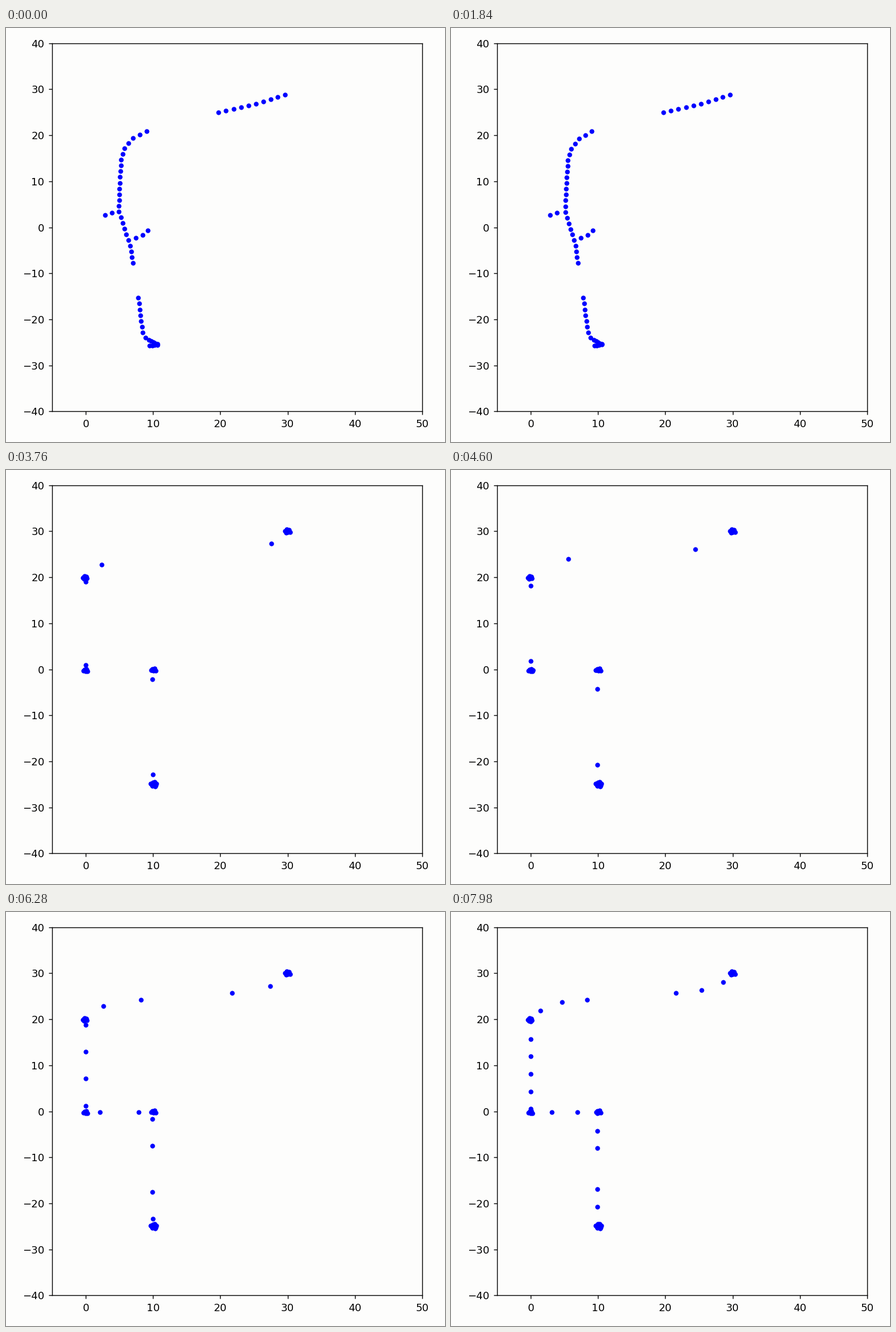
A matplotlib script that plays this animation: 771x726 px, repeating every 8 s.

```python
import numpy as np
import matplotlib.pyplot as plt
from matplotlib.animation import FuncAnimation

W, H, DPI = 771, 726, 128
LEFT, RIGHT, TOP, BOTTOM = 81, 731, 26.6, 672.4
BG = "#fdfdfc"
RESET = 56                      # step at which the swarm restarts
GOLDEN = np.pi * (3 - 5 ** 0.5)


def along(path, dist):
    """Points at the given arc lengths of a polyline."""
    path = np.asarray(path, float)
    seg = np.hypot(*np.diff(path, axis=0).T)
    arc = np.concatenate([[0], np.cumsum(seg)])
    return np.column_stack([np.interp(dist, arc, path[:, c]) for c in (0, 1)])


def spread(path, n):
    """n evenly spaced points from one end of a polyline to the other."""
    length = np.hypot(*np.diff(path, axis=0).T).sum()
    return along(path, np.linspace(0, length, n))


def clump(x, y, n, radius):
    i = np.arange(n)
    r = radius * np.sqrt((i + 0.5) / n)
    return np.column_stack([x + r * np.cos(i * GOLDEN),
                            y + r * np.sin(i * GOLDEN)])


# Late phase: evenly filled strands that slowly straighten.
BODY = [(9.05, 20.85), (7, 19.3), (5.8, 17.3), (5.25, 14.7), (5, 8.5),
        (4.9, 3.5), (5.7, -0.2), (6.6, -4), (7, -7.8)]
STRANDS = [
    spread(BODY, 25),
    spread([(19.7, 24.95), (24.8, 26.6), (29.6, 28.85)], 10),
    spread([(2.9, 2.65), (3.9, 3.1)], 2),
    spread([(7.45, -2.35), (8.45, -1.75), (9.2, -0.7)], 3),
    spread([(7.8, -15.35), (8.45, -22.7), (8.9, -24)], 8),
    spread([(9.4, -24.5), (10.8, -25.5), (9.5, -25.75)], 9),
]


def settled(step):
    pull = 0.08 * step / 40
    parts = []
    for pts in STRANDS:
        chord = np.linspace(pts[0], pts[-1], len(pts))
        parts.append(pts + pull * (chord - pts))
    return np.vstack(parts)


# Early phase: chains creep out of resting hubs towards each other.
REST = np.vstack([clump(30, 30.05, 8, 0.48), clump(-0.1, 19.95, 8, 0.42),
                  clump(-0.05, -0.2, 6, 0.36), clump(10.05, -0.1, 6, 0.42),
                  clump(10.1, -25, 12, 0.52)])
KEYS = [61, 98, 134, 171]       # steps of the keyed tip distances

arc_x = np.linspace(0, 15, 60)
ARC = np.column_stack([arc_x, 20 + 4.4 * (1 - np.exp(-arc_x / 2.5))])

# Each link: half path, sum of both hubs (for mirroring), tip distances.
LINKS = [
    (ARC, (30, 50), [0, 7.1, 9.75, 9.92]),
    ([(0, 0), (0, 10)], (0, 20), [0, 1.8, 7.08, 8.1]),
    ([(0, -0.15), (5, -0.15)], (10, -0.3), [0, 0.35, 2.1, 3.1]),
    ([(9.85, 0), (9.9, -12.5)], (19.8, -25), [0, 4.25, 7.52, 8.05]),
]


def growing(step):
    spacing = 5.85 - 0.056 * (step - 134)
    parts = [REST]
    for path, ends, tips in LINKS:
        dist = np.interp(step, KEYS, tips) - spacing * np.arange(3)
        pts = along(path, dist[dist > 0])
        parts += [pts, ends - pts]
    return np.vstack(parts)


fig = plt.figure(figsize=(W / DPI, H / DPI), dpi=DPI, facecolor=BG)
ax = fig.add_axes([LEFT / W, 1 - BOTTOM / H, (RIGHT - LEFT) / W,
                   (BOTTOM - TOP) / H], facecolor=BG)
ax.set(xlim=(-5, 50), ylim=(-40, 40), xticks=range(0, 51, 10),
       yticks=range(-40, 41, 10))
ax.tick_params(labelsize=10.2, pad=4.2)
dots, = ax.plot([], [], "o", color="#0000ff", ms=4.7, mew=0)


def draw(n):
    # Steps last 20, 100 and 20 ms in turn.
    cycle, slot = divmod(n, 7)
    step = 3 * cycle + (slot > 0) + (slot == 6)
    pts = settled(step) if step < RESET else growing(step)
    dots.set_data(pts[:, 0], pts[:, 1])
    return dots,


anim = FuncAnimation(fig, draw, frames=400, interval=20, repeat=True,
                     repeat_delay=0)
plt.show()
```
